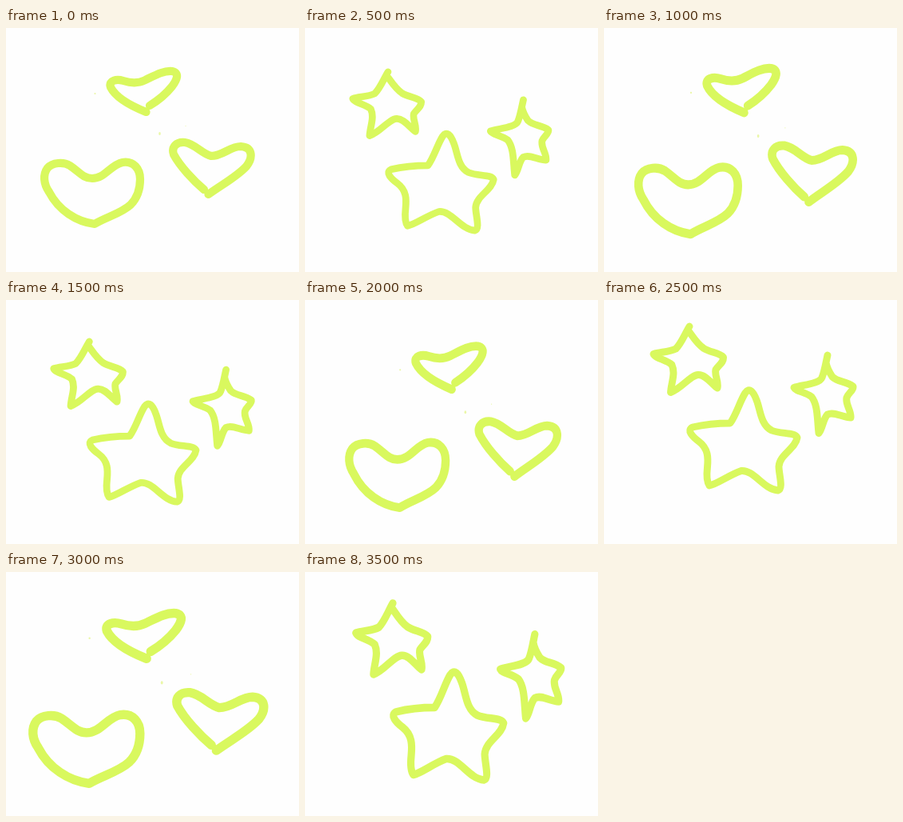
Write an HTML page that moves like this. It is 367 by 305 pixels and loops after 4000 ms.

```html
<!DOCTYPE html>
<html lang="en">
<head>
<meta charset="utf-8">
<title>Hearts and stars</title>
<style>
  html, body { margin: 0; width: 100%; height: 100%; overflow: hidden; background: #fefefe; }
  svg { display: block; width: 100vw; height: 100vh; }
  g { filter: blur(.5px); }
  path { fill: none; stroke: #d9f85e; stroke-linecap: round; stroke-linejoin: round; }
  #hearts path { stroke-width: 10.2; }
  #stars path { stroke-width: 8.9; }
  ellipse { fill: #eaf7a8; }
</style>
</head>
<body>
<svg viewBox="0 0 367 305">
  <g id="hearts">
    <path d="M175.5 105C158 98 138 88 131 74C128 65 139 63.5 147 66C155 68.5 165 69.5 173.5 65.5C186 59.5 197 53 208 54C218 56 214 65 208 73C200 83 189 91.5 180 97"/>
    <path d="M111 245C88 242 66 228 54 205C47 195 46 183 52 175C58 168 72 167 80 172C92 180 97 188 108 188C124 188 131 171 146 168C160 166 168 176 168 189C168 203 164 213 156 221C144 232 126 236 111 245Z"/>
    <path d="M248 202C235 191 218 173 210 158C207 149 213 142 224 143C237 145 245 157 257 160C271 160 281 148 294 148C310 149 309 163 301 173C289 186 270 196 253.5 208"/>
    <ellipse cx="111.5" cy="82" rx="1.1" ry="1.1"/>
    <ellipse cx="192.5" cy="132" rx="1.3" ry="1.9"/>
    <ellipse cx="225" cy="122.5" rx=".6" ry=".6"/>
  </g>
  <g id="stars">
    <path d="M107 33C101 43 97 54 90 61C82 65 70 65 62 67.5C64 73 79 75 85 81C90 92 84 104 83.5 115.5C97 111 108 94 118 93.5C127 93 134 104 142 110C144 102 138 94 140 87C144 81 150 78 149.5 71.5C145 66 133 65.5 125 60.5C117 55 112 47 107 40"/>
    <path d="M158 154C142 154 124 156 111 159C103 163 111 171 119 177C131 186 130.5 198 129.5 209C128.5 218 129 228 132 232C142 230 156 219 172 213.5C188 212 200 237 218 238C225 236 219 218 219 208C220 193 240 186 242 172C239 165 222 168 210 163C196 156 196 137 191 125C187 114 182 109 177 116C170 127 166 143 158 154Z"/>
    <path d="M280 69C278 78 276 90 273 97C270 105 248 106 238 109.5C240 114 252 115 260 121C268 131 267 149 269 166.5C274 161 274 149 280 143C288 139 299 147 309 147C310 138 302 131 304 122C306 116 313 113 312 108C303 101 293 103 286 96C282 90 279 84 278 78"/>
  </g>
</svg>
<script>
const STEP = 500;
const hearts = document.getElementById("hearts");
const stars = document.getElementById("stars");

// Each pose: group, x scale, y scale, x shift, y shift
const poses = [
  [hearts, 1, 1, 0, 0],
  [stars, 0.98, 0.967, -0.9, 23],
  [hearts, 1.0386, 1.085, -6.8, -8.1],
  [stars, 0.99, 0.977, -1.6, 19.7],
  [hearts, 1.008, 1.057, 6.8, 0.7],
  [stars, 1, 1, 0, 0],
  [hearts, 1.118, 1.114, -20, -8.6],
  [stars, 1.028, 1.078, 0, 3.4]
];

const start = performance.now();
let shown = -1;

function show(index) {
  const [group, sx, sy, dx, dy] = poses[index];
  for (const g of [hearts, stars]) g.style.display = g === group ? "" : "none";
  group.setAttribute("transform", `matrix(${sx} 0 0 ${sy} ${dx} ${dy})`);
  shown = index;
}

function tick() {
  const index = Math.floor((performance.now() - start) / STEP) % poses.length;
  if (index !== shown) show(index);
  requestAnimationFrame(tick);
}
tick();
</script>
</body>
</html>
```
